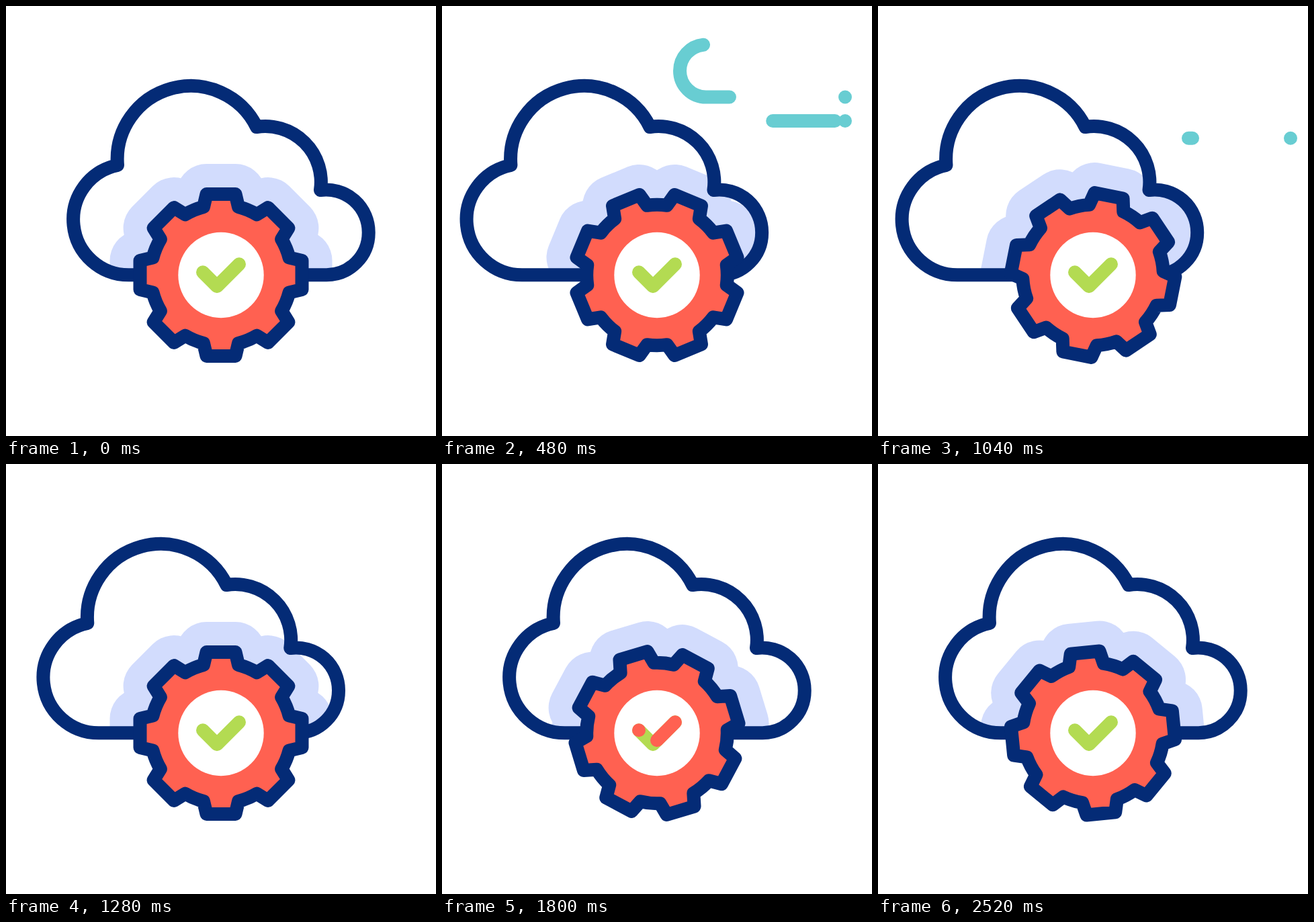
Write an HTML page that moves like this. It is 640 by 640 pixels and loops after 2.56 s.

```html
<!DOCTYPE html>
<html lang="en">
<head>
<meta charset="utf-8">
<title>Cloud and gear</title>
<style>
  html, body { margin: 0; width: 100%; height: 100%; overflow: hidden; background: #fff; }
  svg { display: block; width: 100vw; height: 100vh; }
  path { fill: none; stroke-linecap: round; stroke-linejoin: round; stroke-width: 20; }
  .navy { stroke: #042b76; }
  .teal { stroke: #68cdd2; }
  .green { stroke: #b3db52; }
  .red { stroke: #ff6151; }
</style>
</head>
<body>
<svg viewBox="0 0 640 640">
  <defs>
    <path id="cloudShape" d="M183 400.3A82.5 82.5 0 0 1 166 237A109.3 109.3 0 0 1 373 180
      A83 83 0 0 1 468 274A63.3 63.3 0 0 1 539.7 337.3A63 63 0 0 1 477 400.3Z"/>
    <clipPath id="inside"><use id="clipCloud" href="#cloudShape"/></clipPath>
  </defs>

  <path class="teal" id="curl" d="M600 135.5H393A39 39 0 0 1 393 57.5A39 39 0 0 1 420 69"/>
  <path class="teal" id="mid" d="M600 171H462"/>
  <path class="teal" id="low" d="M614 196.7H462"/>

  <g clip-path="url(#inside)">
    <path id="shade" style="fill:#d2dcfd;stroke:#d2dcfd;stroke-width:90"/>
  </g>
  <use id="cloud" href="#cloudShape" class="navy"/>
  <path id="gear" class="navy" style="fill:#ff6151"/>
  <circle cx="320" cy="400.5" r="63.7" fill="#fff"/>

  <g id="check">
    <path class="green" d="M293 396.3L314 417.3L347 384.3"/>
    <path class="red" id="flash" d="M293 396.3L314 417.3L347 384.3"/>
  </g>
</svg>
<script>
const LOOP = 2560, STEP = 40, SHIFT = 64.5;
const CX = 320, CY = 400.5, TEETH = 8;
const $ = id => document.getElementById(id);

// Sine ease from 0 to 1, beginning at `start` and lasting `dur` ms
function ease(t, start, dur) {
  const u = Math.min(1, Math.max(0, (t - start) / dur));
  return (1 - Math.cos(u * Math.PI)) / 2;
}

function gearPath() {
  const tooth = [[-26, -101.5], [-21.5, -120.5], [21.5, -120.5], [26, -101.5]];
  let d = '';
  for (let i = 0; i < TEETH; i++) {
    const a = i * 2 * Math.PI / TEETH, c = Math.cos(a), s = Math.sin(a);
    tooth.forEach(([x, y], k) => {
      const cmd = k ? 'L' : i ? 'A104.8 104.8 0 0 1 ' : 'M';
      d += cmd + (CX + x * c - y * s).toFixed(2) + ' ' + (CY + x * s + y * c).toFixed(2);
    });
  }
  return d + 'A104.8 104.8 0 0 1 ' + (CX - 26) + ' ' + (CY - 101.5) + 'Z';
}

// Shows only the part of a path between the fractions tail and head
function trim(id, tail, head) {
  const el = $(id), len = el.getTotalLength(), size = (head - tail) * len;
  el.style.display = size > 0.05 ? '' : 'none';
  el.setAttribute('stroke-dasharray', `0 ${tail * len} ${size} ${len * 2}`);
}

function draw(t) {
  const turn = `rotate(${360 * t / LOOP} ${CX} ${CY})`;
  $('gear').setAttribute('transform', turn);
  $('shade').setAttribute('transform', turn);

  const x = -SHIFT * (ease(t, 0, 520) - ease(t, 1095, 495));
  $('cloud').setAttribute('transform', `translate(${x} 0)`);
  $('clipCloud').setAttribute('transform', `translate(${x} 0)`);

  trim('curl', ease(t, 232, 510), ease(t, 0, 600));
  trim('mid', ease(t, 394, 400), ease(t, 204, 400));
  trim('low', ease(t, 691, 400), ease(t, 560, 400));

  const hop = 3.2 * (ease(t, 1300, 180) - ease(t, 1480, 180));
  $('check').setAttribute('transform', `translate(0 ${-hop})`);
  trim('flash', ease(t, 1580, 440), ease(t, 1325, 440));
}

$('gear').setAttribute('d', gearPath());
$('shade').setAttribute('d', gearPath());

function tick() {
  const t = performance.now() % LOOP;
  draw(Math.floor(t / STEP) * STEP);
  requestAnimationFrame(tick);
}
tick();
</script>
</body>
</html>
```
